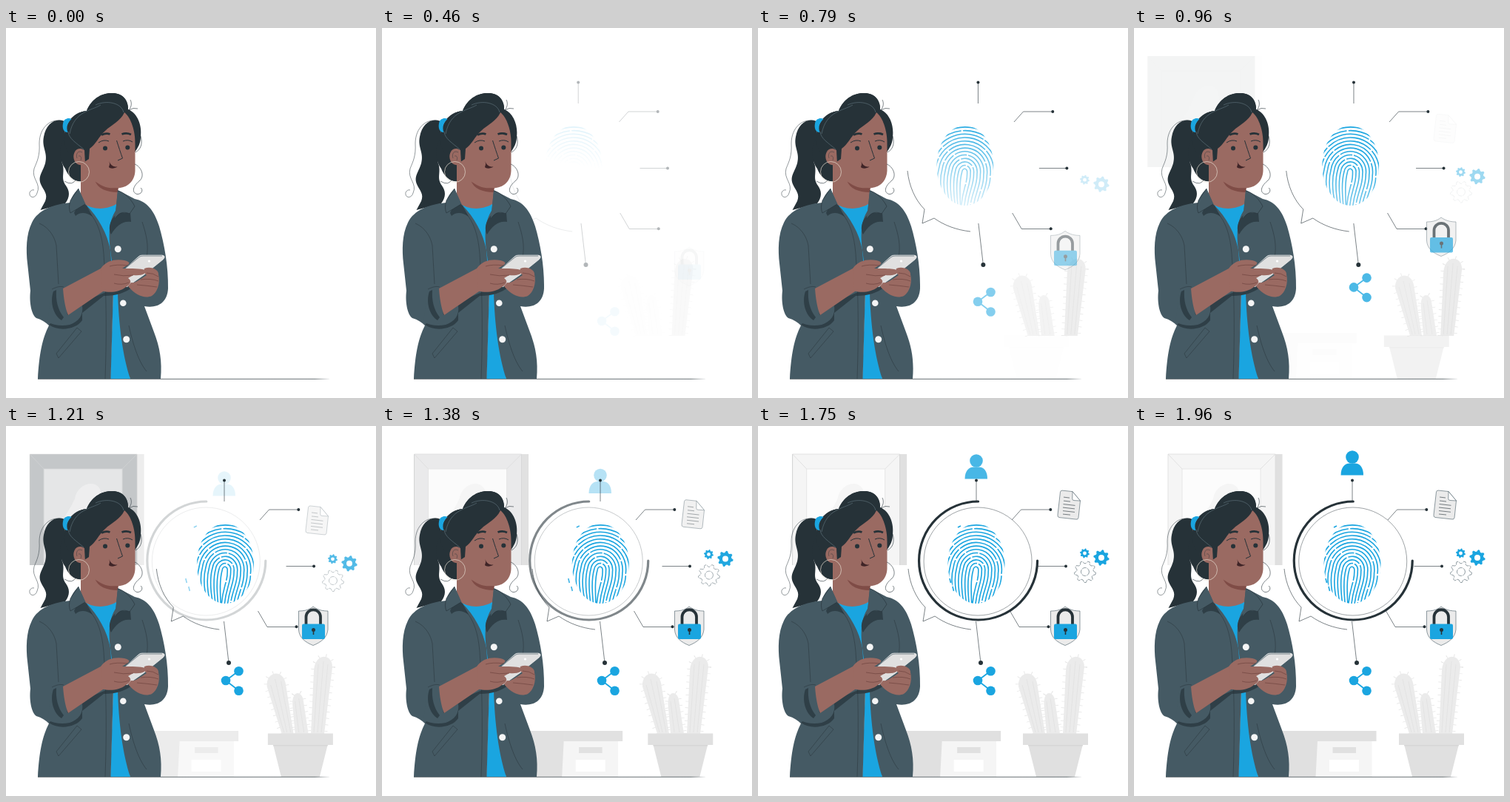
An HTML page that plays this animation: 500 by 500 pixels, repeating every 2 s.

```html
<!DOCTYPE html>
<html lang="en">
<head>
<meta charset="utf-8">
<title>Fingerprint security</title>
<style>
html, body { margin: 0; height: 100%; overflow: hidden; background: #fff }
svg { display: block; width: 100%; height: 100% }
.thin { fill: none; stroke: #263238; stroke-width: .6 }
.dark { fill: #263238 }
.skin { fill: #9a6a62 }
.coat { fill: #455a64 }
.shade { fill: #2f3f47 }
.blue { fill: #1aa5e0 }
.g1 { fill: #e0e0e0 }
.g2 { fill: #ebebeb }
.g3 { fill: #f5f5f5 }
.spines { fill: none; stroke: #e3e3e3; stroke-width: 8; stroke-dasharray: .7 8 }
.ribs { fill: none; stroke: #e0e0e0; stroke-width: .7 }
/* parts fade one by one, so the backing shows through midway */
.layered > * { opacity: var(--a) }
</style>
</head>
<body>
<svg viewBox="0 0 500 500">
<defs>
  <linearGradient id="ink" gradientUnits="userSpaceOnUse" x1="0" y1="132" x2="0" y2="240">
    <stop offset="0" stop-color="#1aa5e0"/><stop offset=".5" stop-color="#1aa5e0"/><stop offset="1" stop-color="#1aa5e0"/>
  </linearGradient>
  <linearGradient id="ground" gradientUnits="userSpaceOnUse" x1="43" y1="0" x2="437" y2="0">
    <stop offset=".95" stop-color="#263238"/><stop offset="1" stop-color="#263238" stop-opacity=".1"/>
  </linearGradient>
  <clipPath id="tip"><ellipse cx="295" cy="186" rx="38.5" ry="54"/></clipPath>
</defs>

<g id="picture" class="layered">
  <path class="dark" d="M46 38H191V188H46z"/>
  <path class="g3" d="M46 38H191V188H46z"/>
  <path class="g1" d="M191 38H200.500V188H191z"/>
  <path fill="#fcfcfc" stroke="#e3e3e3" stroke-width=".8" d="M65 58H171V188H65z"/>
  <path class="g3" d="M78 160C80 135 95 125 107 98C110 78 136 70 142 88C144 105 150 112 152 188H78z"/>
  <path fill="none" stroke="#dcdcdc" stroke-width=".8" d="M46 188V38H191V188M46 38L65 58M191 38L171 58"/>
</g>

<g id="cabinet">
  <path class="g3" d="M190 426H321.500V474H190z"/>
  <path class="g1" d="M170 412H327.500V426H248L245.500 474H170z"/>
  <path class="g1" d="M268.500 434H300V442H268.500z"/>
  <path fill="#fff" d="M264 451H304V467H264z"/>
</g>

<g id="leafA">
  <path class="spines" d="M372 416L352 352C350 333 372 327 377 347L388 416"/>
  <path class="g2" d="M372 416L352 352C350 333 372 327 377 347L388 416z"/>
  <path class="ribs" d="M375 414L357 350M379 414L363 342M384 414L371 345"/>
</g>
<g id="leafB">
  <path class="spines" d="M390 416L386.500 376C386 356 399 358 401 370L408 416"/>
  <path class="g2" d="M390 416L386.500 376C386 356 399 358 401 370L408 416z"/>
  <path class="ribs" d="M395 414L390 372M402 414L395 368"/>
</g>
<g id="leafC">
  <path class="spines" d="M412 416L416 330C418 306 441 307 441 326L430 416"/>
  <path class="g2" d="M412 416L416 330C418 306 441 307 441 326L430 416z"/>
  <path class="ribs" d="M416 414L422 322M421 414L429 318M426 414L435 322"/>
</g>
<g id="pot" class="g1">
  <path d="M365 430H439L428 474H376z"/>
  <path d="M358 415.500H446V431H358z"/>
  <path fill="#d6d6d6" d="M365 431H439L438.700 432.500H365.400z"/>
</g>

<g id="ring">
  <path fill="none" stroke="#263238" stroke-width="3.200" stroke-linecap="round" d="M295.500 102A80 80 0 1 0 375.500 182"/>
  <circle class="thin" cx="295" cy="183" r="73" stroke-opacity=".75"/>
</g>
<g id="print" clip-path="url(#tip)">
  <g id="lines" transform="rotate(8 295 190)" fill="none" stroke="url(#ink)" stroke-width="1.600" stroke-linecap="round"/>
</g>
<path id="bits" fill="none" stroke="#1aa5e0" stroke-width="1.600" d="M270 137l4-2M259 206l1.500 6M263 217l1.500 6"/>
<path id="bubble" class="thin" d="M203 193C205 213 213 232 226 245L223 264L239 257C253 267 270 273 288 275"/>

<g id="person" class="blue">
  <circle cx="295" cy="42" r="8.800"/>
  <path d="M279.500 66.500C279.500 56 285 50.500 291 50.500H299C305 50.500 310 56 310 66.500z"/>
</g>
<g id="topLine"><path class="thin" d="M295 73V102"/><circle class="dark" cx="295" cy="73.500" r="2"/></g>
<g id="upLine"><path class="thin" d="M343 127L355.500 113H395"/><circle class="dark" cx="395.300" cy="113" r="2"/></g>
<g id="midLine"><path class="thin" d="M378.500 189.500H416"/><circle class="dark" cx="416" cy="189.500" r="2"/></g>
<g id="lowLine"><path class="thin" d="M340.500 250L353 271.500H392"/><circle class="dark" cx="392.500" cy="271.300" r="2"/></g>
<g id="footLine"><path class="thin" d="M294.500 264L301 320"/><circle class="dark" cx="301" cy="320" r="3"/></g>

<g id="share" class="blue">
  <path fill="none" stroke="#1aa5e0" stroke-width="1.800" d="M314.500 331L297 344L314.500 357.500"/>
  <circle cx="297" cy="344" r="6.300"/><circle cx="314.500" cy="331.200" r="6.300"/><circle cx="314.500" cy="357.700" r="6.300"/>
</g>
<path id="shield" class="g2" stroke="#455a64" stroke-width=".6" d="M415 244C422 249 429 250 435 250V275C434 286 426 292 415 296.500C404 292 396 286 395.500 275V250C402 250 409 249 415 244z"/>
<g id="lock">
  <path fill="none" stroke="#263238" stroke-width="3.800" d="M405.500 268V258A9.700 9.700 0 0 1 425 258V268"/>
  <rect class="blue" x="400" y="267.500" width="31" height="20.500" rx="2"/>
  <circle class="dark" cx="415.500" cy="275.500" r="2.500"/>
  <path class="dark" d="M414.700 276h1.600v6h-1.600z"/>
</g>
<g id="gears" class="blue"></g>
<g id="cog"></g>
<g id="page">
  <path class="g2" stroke="#455a64" stroke-width=".6" d="M411 87L425 88.500L435.500 101L433 124Q432.500 126.500 430 126L407 123.500Q404.500 123 405 120L408.500 89Q409 87 411 87z"/>
  <path fill="#fff" stroke="#455a64" stroke-width=".6" d="M425 88.500L424.800 98.500Q425 100.500 427 100.500L435.500 101z"/>
  <path class="thin" d="M413 96l8 1M413 101l9 1M412.500 105.500l16 1.800M412 110l16 1.800M412 114.500l16 1.800M412 119l10 1"/>
</g>

<path stroke="url(#ground)" stroke-width=".7" fill="none" d="M43 474.400L437 474.300"/>

<g id="woman">
  <path class="dark" d="M79 126C66 121 54 130 51 147C48 162 57 168 53 183C49 196 43 200 47 211C51 220 57 224 53 234L46.500 246L80 237C87 228 86 220 81 213C74 203 79 198 77 186C73 176 75 164 80 150z"/>
  <path class="dark" d="M104 207C93 209 84 201 80 190C73 180 70 165 78 150C80 130 88 114 109 112C115 96 130 87 144 88C157 88 165 97 165 110C178 115 184 132 182 147C182 156 178 162 174 168L150 180z"/>
  <path class="skin" d="M101 180V238C115 247 140 247 151 238V210z"/>
  <path fill="#7f4c46" d="M120 206C128 215 142 218 152 215.500L151 222C136 222 124 217 120 206z"/>
  <path class="skin" d="M160 114C169 121 175 140 174.500 156V193C174 207 164 216.500 150 216.300C132 214 115 207 104 196V162C120 140 145 130 160 114z"/>
  <path class="dark" d="M80 160C78 135 88 114 109 112C115 96 130 87 144 88C157 88 166 97 165 111L160 114C155 126 142 131 134 139C125 147 121 158 113 163L112 177L106 181L104 164C96 164 92 167 90 178z"/>
  <path class="skin" d="M106 165C97 159 90 167 91.500 176C93 184 99 187 107 184z"/>
  <path class="thin" stroke-opacity=".7" d="M103 168C97 165 94 170 96 176M98 173C102 172 102 176 101 179"/>
  <path class="blue" d="M77 129C78 122 85 121 88.500 123C83 128 81 134 83.500 141C77 141 76 134 77 129z"/>
  <path fill="none" stroke="#6f848e" stroke-width=".5" d="M121 104C136 97 156 101 159 114M84 140C85 150 95 155 105 164M86 143C92 112 115 112 128 104"/>
  <g class="thin">
    <path d="M77 126C60 121 45 135 45 156C46 173 42 180 38 190C34 204 48 210 42 223C40 230 33 230 32 225C31 221 35 218 38 219" stroke-width=".5"/>
    <path d="M174 184C182 187 188 199 181 206C172 213 169 222 177 224.500C183 225 186 219 182 216"/>
    <path d="M182 146C185 157 182 164 175 168M166 111C170 106 170 101 168 97M166 111Q172 107 178 109M79 207Q90 214 95 204"/>
    <path d="M149.500 152C152 160 155 169 157.500 176L151 179" stroke-width="1"/>
    <path d="M125 155Q132 150 139 153M158 153Q165 150 171 154" stroke-width="1"/>
    <path d="M129 144.500Q135 141.500 140.500 143.500M156.500 143.500Q163 141 169 144" stroke-width="2.800"/>
  </g>
  <circle class="dark" cx="134" cy="162.500" r="3"/><circle class="dark" cx="164.300" cy="161.500" r="3"/>
  <path fill="#3f2427" d="M139.500 180C141 185 145 188 150.500 187.500C147 190 141 190.500 139 188Q141 184 139.500 180z"/>
  <circle cx="98.500" cy="194.500" r="14" fill="none" stroke="#e6ddd0" stroke-width=".7"/>

  <path class="blue" d="M103 236C118 247 138 246 152 236L150 300L145 340L152 356L168 474H141L145 350z"/>
  <path class="coat" d="M98 217C90 225 87 232 87 236C64 238 43 246 35 263C27 279 27 300 29 318L33 355C31 372 35 388 41 392C48 394 54 398 58 402C49 420 45 440 43 474H141.500L145 356L141 300C137 278 125 256 108 239z"/>
  <path class="coat" d="M151 219L148.500 246C140 260 138 275 141 300L145 330L151 356C152 400 158 445 168 474H209C211 450 208 432 200 411L187 376C204 379 218 372 219 352C219.500 322 214 292 207 268C200 246 190 234 174 231z"/>
  <path class="shade" d="M92 250C95 242 103 235 109 240L117 255C108 248 99 249 94 254z"/>
  <path class="shade" d="M142 279C136 268 144 252 154 250H168L169 262C158 260 149 267 142 279z"/>
  <path class="coat" d="M98 217L87 233Q84 243 87 250L107 238zM151 220C160 222 169 231 174 241L167 251C158 247 152 250 147 258z"/>
  <path class="thin" d="M98 217L87 233Q84 243 87 250L107 238M151 220C160 222 169 231 174 241L167 251C158 247 152 250 147 258"/>
  <path class="shade" d="M58 401C72 411 95 407 103 395V385L132 362C150 362 160 358 172 350L166 344L80 380z"/>
  <path class="coat" d="M62 352C70 349 76 348 79 350L83 388L103 375C105 388 98 397 86 401C76 403 64 402 56 397z"/>
  <path class="shade" d="M64 356C59 370 64 388 75 395L78 391C70 381 67 368 68 354z"/>
  <path class="skin" d="M77 352L128 325L137 352L128 358L84 388C80 378 78 366 77 352z"/>
  <path class="thin" stroke-opacity=".8" d="M45 264C59 270 66 283 68 294L71 346M113 250C124 262 130 280 132 305C136 360 136 420 134 474M184 262C190 280 193 295 190 309M166 402C172 430 180 452 190 464M68 440L96 405L102 410L71 446zM62 353C70 349 74 349 78 350"/>

  <path class="g1" stroke="#fff" stroke-width=".6" d="M158 328L179 309Q181 307 184 307H211Q217 308 212 313L186 334L163 350z"/>
  <path fill="none" stroke="#455a64" stroke-width=".7" d="M161 325L180 309.500Q182 308 185 308H211"/>
  <circle cx="193.500" cy="315" r="1.600" fill="#fff"/>
  <path class="skin" d="M128 325C136 314 148 312 160 314Q168 316 166 319L157 325C170 325 183 325 187 327C191 332 184 335 172 334L165 338C171 342 168 347 162 350C152 358 138 358 129 355z"/>
  <path class="skin" d="M187 325C196 321 207 327 206 333C209 345 204 358 197 362C188 366 176 362 165 349L169 344C176 345 180 340 190 334Q185 330 187 325z"/>
  <path fill="none" stroke="#6f443f" stroke-width=".7" d="M140 322Q149 319 165 321M146 333Q158 336 172 334M146 345Q156 348 166 344M190 331Q199 331 206 336M182 340Q196 338 206 342M177 347Q190 348 204 350"/>
  <g class="g3"><circle cx="151.300" cy="298.700" r="4.500"/><circle cx="158.300" cy="371.700" r="4.300"/><circle cx="162.700" cy="420.700" r="4.500"/></g>
</g>
</svg>

<script>
const el = id => document.getElementById(id);
const clamp = v => Math.max(0, Math.min(1, v));
const smooth = v => (v = clamp(v), v * v * (3 - 2 * v));

function gear(x, y, r, teeth) {
  let d = '';
  for (let k = 0; k < teeth * 4; k++) {
    const a = (k + .5) * Math.PI / teeth / 2, q = k % 4 < 2 ? r : r * .78;
    d += `${k ? 'L' : 'M'}${x + q * Math.cos(a)} ${y + q * Math.sin(a)}`;
  }
  return `<path d="${d}z"`;
}
const hole = (x, y, r) => `<circle cx="${x}" cy="${y}" r="${r}" fill="#fff"`;

el('gears').innerHTML =
  gear(441.5, 172, 6.5, 8) + '/>' + hole(441.5, 172, 2.4) + '/>' +
  gear(464, 178, 10.7, 8) + '/>' + hole(464, 178, 4) + '/>';
const outline = ' stroke="#455a64" stroke-width=".6" stroke-dasharray="6 1"/>';
el('cog').innerHTML = gear(442, 197, 14.5, 9) + ' fill="#fff"' + outline + hole(442, 197, 5.5) + outline;

// Nested leaning arches with wavy legs, trimmed to the fingertip
let arches = '';
for (let i = 1; i < 14; i++) {
  const r = 4.5 * i - 1, l = 295 - r, e = 295 + r;
  arches += `<path stroke-dasharray="${64 + i * 17 % 29} 3.5" d="M${l + r * .3 + 5} 250C${l + 2} 228 ${l - 2} 210 ${l} 195` +
    `A${r} ${4.7 * i} 0 0 1 ${e} 195C${e + 3} 212 ${e - 5} 222 ${e - r * .15} 250"/>`;
}
el('lines').innerHTML = arches;

// id, axis, distance, start, move time, overshoot, fade start, fade time
const parts = [
  ['picture', 'x', 28, 920, 600, .07, 930, 470],
  ['cabinet', 'x', 27, 920, 600, .07, 920, 480],
  ['leafA', 'x', 30, 400, 600, .05, 430, 650],
  ['leafB', 'x', 30, 400, 600, .05, 430, 650],
  ['leafC', 'x', 27, 290, 560, .1, 310, 540],
  ['pot', 'x', 26, 780, 600, .05, 780, 450],
  ['ring', 'x', 26, 1130, 600, .08, 1120, 440],
  ['print', 'x', 36, 450, 640, .05, 0, 1],
  ['bits', 'x', 18, 1120, 450, 0, 1000, 450],
  ['bubble', 'x', 36, 325, 580, .08, 400, 380],
  ['topLine', 'x', 40, 290, 530, .07, 290, 480],
  ['upLine', 'x', 31, 290, 520, .1, 290, 480],
  ['midLine', 'x', 38, 300, 560, .08, 290, 480],
  ['lowLine', 'x', 27, 280, 520, .12, 290, 480],
  ['footLine', 'x', 35, 290, 520, .1, 290, 480],
  ['share', 'y', -52, 490, 600, 0, 430, 680],
  ['shield', 'y', -52, 490, 680, 0, 430, 780],
  ['lock', 'y', -52, 500, 720, 0, 430, 800],
  ['gears', 'y', -47, 400, 1090, 0, 640, 760],
  ['cog', 'y', -33, 640, 960, 0, 880, 600],
  ['page', 'y', -30, 880, 900, 0, 920, 680],
  ['person', 'y', -28, 1210, 740, 0, 1130, 780]
];
const stops = document.querySelectorAll('#ink stop');

function slide(age, time, over) {
  return age < time ? (1 + over) * smooth(age / time) - 1 : over * (1 - smooth((age - time) / 380));
}

function draw(t) {
  for (const [id, axis, dist, start, time, over, fade, fadeTime] of parts) {
    const node = el(id), d = dist * slide(t - start, time, over), a = clamp((t - fade) / fadeTime);
    node.setAttribute('transform', axis == 'x' ? `translate(${d})` : `translate(0 ${d})`);
    if (id == 'picture') node.style.setProperty('--a', a);
    else node.setAttribute('opacity', a);
  }
  [400, 570, 720].forEach((s, i) => stops[i].setAttribute('stop-opacity', clamp((t - s) / 420)));
}

const rate = .024; // steps per ms
let first;
function tick(now) {
  first ??= now;
  const step = Math.min(47, Math.floor((now - first) % 2000 * rate + .1));
  draw(step / rate);
  requestAnimationFrame(tick);
}
draw(0);
requestAnimationFrame(tick);
</script>
</body>
</html>
```
